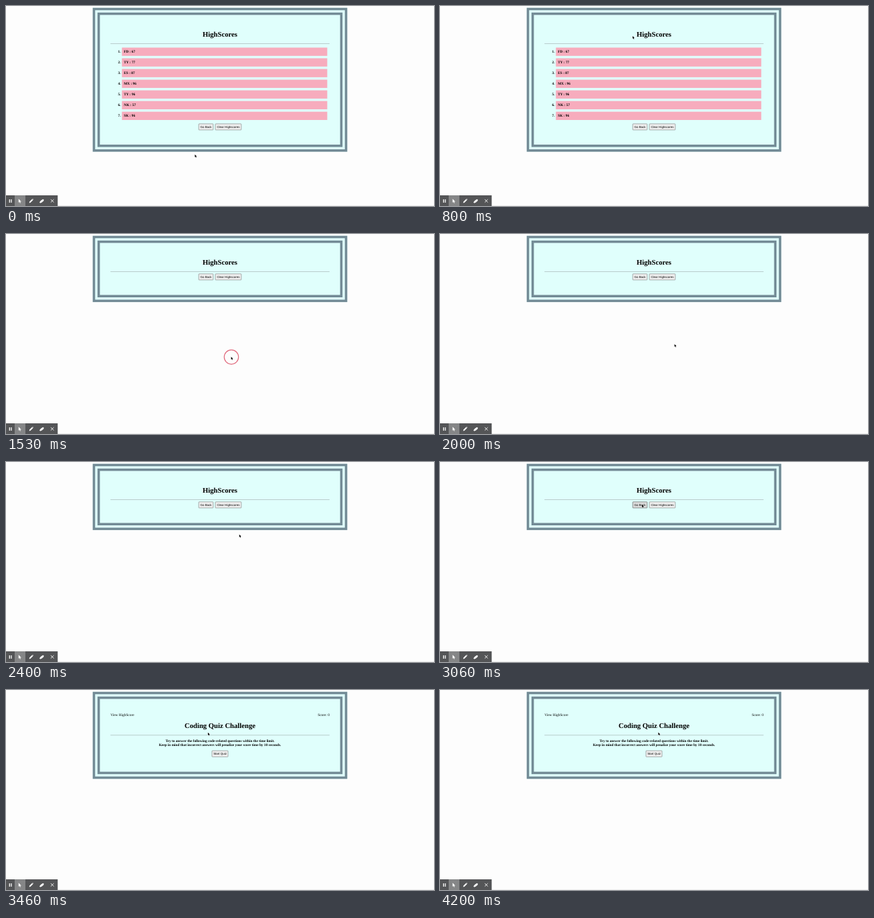
An HTML page for the animation above (4260 ms loop, 640x300 px).

```html
<!DOCTYPE html>
<html lang="en">
<head>
<meta charset="utf-8">
<title>HighScores</title>
<style>
html, body { margin: 0; width: 100%; height: 100%; overflow: hidden; background: #fdfdfd; }
svg { display: block; width: 640px; height: 300px; }
text { text-rendering: geometricPrecision; font: 5.333px "Liberation Serif", "Times New Roman", serif; }
.bold { font-weight: bold; }
.title { font-weight: bold; font-size: 10.667px; }
.mid { text-anchor: middle; }
.end { text-anchor: end; }
.edge { fill: none; stroke: #738b96; stroke-width: 3.6; }
.rule { fill: #b4c6c6; }
.btn rect { fill: #efefef; stroke: #777; stroke-width: .6; }
.btn text { font: 4.444px "Liberation Sans", Arial, sans-serif; text-anchor: middle; }
.btn.hover rect { fill: #dcdcdc; stroke: #4f4f4f; }
.btn.active rect { fill: #f5f5f5; stroke: #a0a0a0; }
</style>
</head>
<body>
<svg viewBox="0 0 640 300">
  <rect y="299" width="640" height="1" fill="#eeeeee"/>

  <g id="panel">
    <rect id="fill" x="129.7" y="2.7" width="380.6" fill="#e0fffc"/>
    <rect id="outer" class="edge" x="131.5" y="4.5" width="377"/>
    <rect id="inner" class="edge" x="138.6" y="11.6" width="362.8"/>
  </g>

  <g id="scores">
    <text class="title mid" x="320" y="46.2">HighScores</text>
    <rect class="rule" x="156.2" y="56" width="327.6" height=".9"/>
    <g id="list"></g>
    <g id="buttons">
      <g id="back" class="btn">
        <rect x="288.2" y="59.8" width="21.6" height="9.1" rx=".6"/>
        <text x="299" y="65.9">Go Back</text>
      </g>
      <g id="clear" class="btn">
        <rect x="313.1" y="59.8" width="38.7" height="9.1" rx=".6"/>
        <text x="332.4" y="65.9">Clear Highscores</text>
      </g>
    </g>
  </g>

  <g id="quiz">
    <text x="156.2" y="39.1">View HighScore</text>
    <text class="end" x="483.8" y="39.1">Score: 0</text>
    <text class="title mid" x="320" y="57.2">Coding Quiz Challenge</text>
    <rect class="rule" x="156.2" y="67.3" width="327.6" height=".9"/>
    <text class="bold mid" x="320" y="78.2">Try to answer the following code-related questions within the time limit.</text>
    <text class="bold mid" x="320" y="84.3">Keep in mind that incorrect answers will penalize your score time by 10 seconds.</text>
    <g class="btn">
      <rect x="308" y="91.1" width="24" height="9.1" rx=".6"/>
      <text x="320" y="97.1">Start Quiz</text>
    </g>
  </g>

  <g id="toolbar">
    <rect y="284" width="77.3" height="16" fill="#545557"/>
    <rect x="13" y="284" width="16" height="16" fill="#858687"/>
    <g fill="#fff">
      <path d="M4.7 290h1.3v5h-1.3zM7.3 290h1.3v5h-1.3z"/>
      <path d="M18.8 289.3v5.6l1.3-1.1 .9 2 1-.5-.9-1.9h1.8z"/>
      <path d="M34.7 295.4l.4-1.8 3.8-3.8 1.4 1.4-3.8 3.8zM39.3 289.4l.6-.5 1.3 1.3-.5.6z"/>
      <path d="M50 294.4l2.2-2.7 3-2 1.4.7-.4 1.9-2.4 2.2-2.6 1.3z"/>
    </g>
    <path d="M66.9 290l4.6 4.6M71.5 290l-4.6 4.6" stroke="#fff" stroke-width=".9"/>
  </g>

  <circle id="ring" fill="none" stroke="#e06a7d" stroke-width="1.2"/>
  <path id="cursor" d="M0 0V4L.9 3.2 1.6 4.7 2.4 4.3 1.7 2.9H2.9Z"
        fill="#000" stroke="#fff" stroke-width=".5" paint-order="stroke"/>
</svg>

<script>
const LOOP = 4260, FPS = 15;
const CLEAR_AT = 23, QUIZ_AT = 50, CLICK_LENGTH = 4;
const clicks = { clear: 21, back: 48 };
const $ = id => document.getElementById(id);

// resting places of the pointer
const below = [282.4, 222.7], onClear = [336.6, 184.2], under = [348.8, 108.7],
      onBack = [301.9, 63.8], aside = [326.4, 63.5];

const mix = (a, b, k) => a.map((v, i) => v + (b[i] - v) * k);
const curve = (a, mid, b) => k => mix(mix(a, mid, k), mix(mid, b, k), k);

// one sweep around the list, pulled onto both end points
function sweep(a, b) {
  const orbit = k => {
    const angle = 1.3 - 5.6 * k;
    return [80 * Math.cos(angle), 85 * Math.sin(angle)];
  };
  const shift = (p, k) => p.map((v, i) => v - orbit(k)[i]);
  return k => mix(shift(a, 0), shift(b, 1), k).map((v, i) => v + orbit(k)[i]);
}

const legs = [
  { from: 3, to: 18, at: sweep(below, onClear) },
  { from: 28, to: 36, at: curve(onClear, [372, 146], under) },
  { from: 36, to: 46, at: curve(under, [320, 62], onBack) },
  { from: 61, to: 63, at: curve(onBack, [312, 63.8], aside) }
];

function tipAt(tick) {
  const leg = legs.filter(l => tick >= l.from).pop() || legs[0];
  const k = (tick - leg.from) / (leg.to - leg.from);
  return leg.at(Math.min(1, Math.max(0, k)));
}

const scores = ["FD : 67", "TY : 77", "ES : 87", "MX : 96", "TY : 96", "NK : 57", "SK : 96"];
$("list").innerHTML = scores.map((s, i) => {
  const y = 62.4 + i * 16.03;
  return `<rect x="173.3" y="${y}" width="307.1" height="12.4" fill="#f7acbd"/>
    <text class="bold end" x="171.6" y="${y + 7.8}">${i + 1}.</text>
    <text class="bold" x="176.3" y="${y + 7.8}">${s}</text>`;
}).join("");

function show(id, on) { $(id).style.display = on ? "" : "none"; }

function set(id, attrs) {
  for (const name in attrs) $(id).setAttribute(name, attrs[name]);
}

function paintButton(id, x, y, down) {
  const box = $(id).querySelector("rect").getBBox();
  const over = x >= box.x && x <= box.x + box.width && y >= box.y && y <= box.y + box.height;
  set(id, { class: "btn" + (over ? (down ? " active" : " hover") : "") });
}

function draw(ms) {
  const tick = Math.floor((ms % LOOP + 7) * FPS / 1000);
  const listed = tick < CLEAR_AT, quiz = tick >= QUIZ_AT;
  const drop = listed ? 117 : 0;
  const [x, y] = tipAt(tick);

  const bottom = quiz ? 133.3 : listed ? 218.6 : 102.1;
  set("fill", { height: bottom - 2.7 });
  set("outer", { height: bottom - 6.3 });
  set("inner", { height: bottom - 20.5 });

  show("scores", !quiz);
  show("quiz", quiz);
  show("list", listed);
  set("buttons", { transform: `translate(0 ${drop})` });

  show("ring", false);
  for (const id in clicks) {
    const age = tick - clicks[id];
    const down = age >= 0 && age < CLICK_LENGTH;
    if (!quiz) paintButton(id, x, y - drop, down);
    if (!down) continue;
    show("ring", true);
    set("ring", {
      cx: x + .4, cy: y + .4,
      r: Math.min(10.7, 8 + 2.7 * age),
      opacity: Math.min(1, (CLICK_LENGTH - age) / 2)
    });
  }
  set("cursor", { transform: `translate(${x} ${y})` });
}

const start = performance.now();
function loop() {
  draw(performance.now() - start);
  requestAnimationFrame(loop);
}
loop();
</script>
</body>
</html>
```
